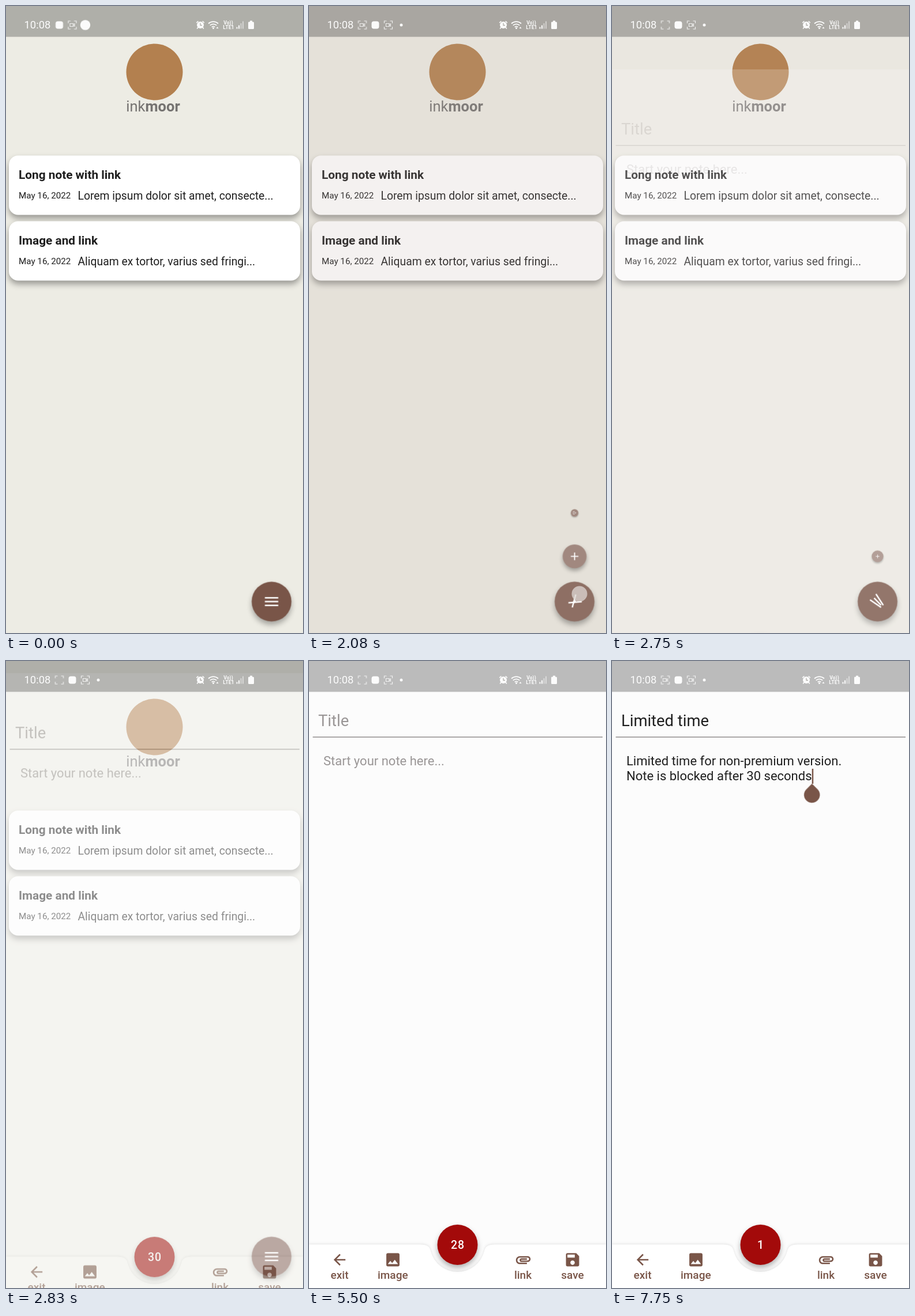
These frames come from a looping animation (515x1088 px, 8000 ms). An HTML page:

```html
<!DOCTYPE html>
<html lang="en">
<head>
<meta charset="utf-8">
<title>Notes app</title>
<style>
html, body { margin: 0; width: 100%; height: 100%; overflow: hidden; background: #edece4; }
svg { display: block; width: 100%; height: 100%; font-family: Roboto, sans-serif; }

/* Every animation is paused; the script moves --d along in 12 fps steps. */
.a { animation: 8s linear var(--d, 0s) infinite paused; }

.card { fill: #fff; filter: drop-shadow(0 6px 5.5px rgba(0,0,0,.36)); }
.head { font-size: 20.8px; font-weight: 700; }
.date { font-size: 15.2px; }
.text { font-size: 19.33px; }
.ink { fill: #1f1f1f; }
.hint { fill: #9a9696; }
.title { font-size: 27.4px; }
.body { font-size: 22px; }
.mid { text-anchor: middle; }
.lift { filter: drop-shadow(0 6px 5px rgba(0,0,0,.3)); }
.nav { fill: #795548; font-size: 19px; font-weight: 500; }
.white { fill: #fff; }
.line { fill: none; stroke: #fff; stroke-width: 2.5; }

.scrim { animation-name: scrim; }
.plus { animation-name: plus; }
.exit { animation-name: exit; }
.star { animation-name: star; }
.spin { animation-name: spin; }
.top { animation-name: top; }
.center { animation-name: center; }
.bottom { animation-name: bottom; }
.ripple { animation-name: ripple; }
.page { animation-name: rise, fade; }
.before { animation-name: before; }
.after { animation-name: after; }
.on-off { animation-name: onoff; animation-duration: 1s; }
.off-on { animation-name: offon; animation-duration: 1s; }
.tap1 { animation-name: tap1; }
.tap2 { animation-name: tap2; }
.shift { animation-name: shift; }
.appear { animation-name: appear; }
.shrink { animation-name: shrink; }

@keyframes scrim { 0%, 24.3% { opacity: 0 } 28.5%, 33.35% { opacity: .385 } 34.6%, 100% { opacity: 0 } }
@keyframes plus { 0%, 24.6% { transform: scale(0) } 26.6%, 34% { transform: scale(1) } 34.6%, 100% { transform: scale(0) } }
@keyframes exit { 0%, 25.6% { transform: scale(0) } 27.6%, 33.6% { transform: scale(1) } 34.1%, 100% { transform: scale(0) } }
@keyframes star { 0%, 26.6% { transform: scale(0) } 28.6%, 33.35% { transform: scale(1) } 33.8%, 100% { transform: scale(0) } }
@keyframes spin { 0%, 24.3% { transform: rotate(0deg) } 26.55%, 33.35% { transform: rotate(180deg) } 34.74%, 100% { transform: rotate(0deg) } }
@keyframes top { 0%, 24.3% { transform: translateY(-6.6px) rotate(0deg) } 26.55%, 33.35% { transform: translateY(0px) rotate(45deg) } 34.74%, 100% { transform: translateY(-6.6px) rotate(0deg) } }
@keyframes center { 0%, 24.3% { transform: scaleX(1) } 26.55%, 33.35% { transform: scaleX(0) } 34.74%, 100% { transform: scaleX(1) } }
@keyframes bottom { 0%, 24.3% { transform: translateY(6.6px) rotate(0deg) } 26.55%, 33.35% { transform: translateY(0px) rotate(-45deg) } 34.74%, 100% { transform: translateY(6.6px) rotate(0deg) } }
@keyframes ripple { 0%, 23.9% { opacity: 0 } 25%, 26.2% { opacity: .16 } 28.5%, 100% { opacity: 0 } }
@keyframes rise {
  0%, 32.92% { transform: translateY(272px); animation-timing-function: cubic-bezier(.4,0,.2,1) }
  36.67%, 100% { transform: translateY(0px) }
}
@keyframes fade {
  0%, 32.95% { opacity: 0; animation-timing-function: ease-in }
  36.7%, 100% { opacity: 1 }
}
@keyframes before { 0%, 70.82% { opacity: 1 } 70.83%, 100% { opacity: 0 } }
@keyframes after { 0%, 70.82% { opacity: 0 } 70.83%, 100% { opacity: 1 } }
@keyframes onoff { 0%, 49.9% { opacity: 1 } 50%, 100% { opacity: 0 } }
@keyframes offon { 0%, 49.9% { opacity: 0 } 50%, 100% { opacity: 1 } }
@keyframes tap1 { 0%, 23.9% { opacity: 0 } 24%, 26.5% { opacity: .75 } 27.5%, 100% { opacity: 0 } }
@keyframes tap2 { 0%, 32.1% { opacity: 0 } 32.2%, 33.9% { opacity: .5 } 34.3%, 100% { opacity: 0 } }
@keyframes shift {
  0%, .5% { transform: translateX(-22.5px); animation-timing-function: ease-in-out }
  5.5%, 100% { transform: translateX(0px) }
}
@keyframes appear { 0%, 2% { opacity: 0 } 5.5%, 100% { opacity: 1 } }
@keyframes shrink { 0%, .5% { transform: scale(3.5) } 5.5%, 100% { transform: scale(1) } }
</style>
</head>
<body>
<svg viewBox="0 0 515 1088" preserveAspectRatio="none">
  <defs>
    <path id="frame" class="line" style="stroke-width:1.2" opacity=".85" d="M-7-3v-4h4M3-7h4v4M7 3v4h-4M-3 7h-4v-4"/>
    <path id="cam" class="line" style="stroke-width:1.1" opacity=".85" d="M-4-2.500h5.500v5h-5.500zM1.500-.5L4-2v4L1.500 .5"/>
    <path id="bar" class="line" d="M-11.6 0H11.6"/>
  </defs>

  <g id="home">
    <rect width="515" height="1088" fill="#edece4"/>
    <circle cx="257.5" cy="114.5" r="49" fill="#b3804f"/>
    <text class="mid" x="255" y="183" font-size="25.5" fill="#757371">ink<tspan font-weight="600">moor</tspan></text>
    <g class="ink">
      <rect class="card" x="5" y="259.5" width="505" height="103" rx="16"/>
      <text class="head" x="22" y="300">Long note with link</text>
      <text class="date" x="22" y="334">May 16, 2022</text>
      <text class="text" x="124.5" y="335.5">Lorem ipsum dolor sit amet, consecte...</text>
      <rect class="card" x="5" y="373.5" width="505" height="103" rx="16"/>
      <text class="head" x="22" y="414">Image and link</text>
      <text class="date" x="22" y="448">May 16, 2022</text>
      <text class="text" x="124.5" y="449.5">Aliquam ex tortor, varius sed fringi...</text>
    </g>
    <rect class="a scrim" width="515" height="1088" fill="#b9a99f"/>

    <g transform="translate(460.5 804)"><g class="a star">
      <circle class="lift" r="28.5" fill="#a30a0a"/>
      <path class="white" transform="scale(1.27) translate(-12 -12)" d="M12 17.27L18.18 21l-1.64-7.03L22 9.24l-7.19-.61L12 2 9.19 8.63 2 9.24l5.46 4.73L5.82 21z"/>
    </g></g>
    <g transform="translate(460.5 879.5)"><g class="a exit">
      <circle class="lift" r="28.5" fill="#a1887f"/>
      <path class="line" d="M0-6v-4.5h-10.5v21H0V6M-4 0H10M6-4.5L10.5 0 6 4.5"/>
    </g></g>
    <g transform="translate(460.5 955)"><g class="a plus">
      <circle class="lift" r="28.5" fill="#a1887f"/>
      <path class="line" d="M-9 0H9M0-9V9"/>
    </g></g>
    <g transform="translate(460.5 1033.5)">
      <circle class="lift" r="34.5" fill="#795548"/>
      <circle class="a ripple white" r="34.5"/>
      <g class="a spin">
        <g class="a top"><use href="#bar"/></g>
        <g class="a center"><use href="#bar"/></g>
        <g class="a bottom"><use href="#bar"/></g>
      </g>
    </g>
  </g>

  <g class="a page">
    <rect width="515" height="1088" fill="#fcfcfc"/>
    <path d="M6.5 132H509" stroke="#8f8c8c" stroke-width="1.4"/>
    <g class="a before hint">
      <text class="title" x="16" y="113">Title</text>
      <text class="body" x="25" y="180.5">Start your note here...</text>
    </g>
    <g class="a after">
      <g class="ink">
        <text class="title" x="16" y="113">Limited time</text>
        <text class="body" x="25" y="180.5">Limited time for non-premium version.</text>
        <text class="body" x="25" y="206.5">Note is blocked after 30 seconds</text>
      </g>
      <rect class="a off-on" x="346.7" y="187" width="2.5" height="26" fill="#795548"/>
      <path transform="translate(346.7 232.3) rotate(45)" fill="#795548" d="M-13.7 0V-13.7H0A13.7 13.7 0 1 1-13.7 0z"/>
    </g>

    <path fill="#fff" style="filter:drop-shadow(0 -1px 2px rgba(0,0,0,.1))" d="M0 1012.5H192C205 1012.5 209 1016 211 1024A48 48 0 0 0 304 1024C306 1016 310 1012.5 323 1012.5H515V1088H0z"/>
    <circle cx="257.5" cy="1013" r="35" fill="#a30a0a" style="filter:drop-shadow(0 5px 5px rgba(0,0,0,.3))"/>
    <text id="secs" class="mid white" x="258" y="1019.5" font-size="19.5" font-weight="500" letter-spacing="1">30</text>
    <g class="nav">
      <path transform="translate(53 1039) scale(1.27) translate(-12 -12)" d="M20 11H7.83l5.59-5.59L12 4l-8 8 8 8 1.41-1.41L7.83 13H20z"/>
      <path transform="translate(145.5 1039) scale(1.27) translate(-12 -12)" d="M21 19V5c0-1.1-.9-2-2-2H5c-1.1 0-2 .9-2 2v14c0 1.1.9 2 2 2h14c1.1 0 2-.9 2-2zM8.5 13.5l2.5 3.01L14.5 12l4.5 6H5z"/>
      <path transform="translate(371.5 1039) scale(1.27) translate(-12 -12)" d="M2 12.5C2 9.46 4.46 7 7.5 7H18c2.21 0 4 1.79 4 4s-1.79 4-4 4H9.5C8.12 15 7 13.88 7 12.5S8.12 10 9.5 10H17v2H9.41c-.55 0-.55 1 0 1H18c1.1 0 2-.9 2-2s-.9-2-2-2H7.5C5.57 9 4 10.57 4 12.5S5.57 16 7.5 16H17v2H7.5C4.46 18 2 15.54 2 12.5z"/>
      <path transform="translate(457 1039) scale(1.27) translate(-12 -12)" d="M17 3H5c-1.11 0-2 .9-2 2v14c0 1.1.89 2 2 2h14c1.1 0 2-.9 2-2V7l-4-4zm-5 16c-1.66 0-3-1.34-3-3s1.34-3 3-3 3 1.34 3 3-1.34 3-3 3zm3-10H5V5h10v4z"/>
      <g class="mid">
        <text x="53" y="1072">exit</text>
        <text x="145.3" y="1072">image</text>
        <text x="371" y="1072">link</text>
        <text x="457" y="1072">save</text>
      </g>
    </g>
  </g>

  <g id="status">
    <rect width="515" height="53.5" fill="#000" opacity=".26"/>
    <g class="white" opacity=".95">
      <text x="31.5" y="39" font-size="18.4">10:08</text>
      <g class="a appear"><g transform="translate(92.5 33)">
        <use href="#frame"/>
        <g class="a before"><use class="a on-off" href="#cam"/></g>
        <g class="a after"><use class="a off-on" href="#cam"/></g>
      </g></g>
      <g class="a shift">
        <rect x="108.5" y="26.5" width="13" height="13" rx="4"/>
        <g transform="translate(137.5 33)"><use href="#frame"/><use href="#cam"/></g>
        <g transform="translate(160 33)"><circle class="a shrink" r="2.5"/></g>
      </g>

      <g transform="translate(337 33)">
        <circle r="6"/>
        <path class="line" style="stroke-width:1.6" d="M-6.8-3.8l3.2-2.800M6.800-3.800L3.600-6.600M-4 4l-1.800 2.500M4 4l1.800 2.500"/>
        <path fill="none" stroke="#b0aeaa" stroke-width="1.3" d="M0-3.500V.5H3"/>
      </g>
      <g transform="translate(359.5 39)">
        <path class="line" style="stroke-width:1.8" d="M-8.5-8.5A12.5 12.5 0 0 1 8.5-8.5M-5.7-5.4A8.3 8.3 0 0 1 5.7-5.4M-2.8-2.4A4.2 4.2 0 0 1 2.8-2.4"/>
        <circle r="1.5" cy="-.5"/>
        <path d="M5 0l2-3 2 3z"/>
      </g>
      <g class="mid" font-weight="700">
        <text x="385.5" y="32" font-size="8.6">Vo))</text>
        <text x="386" y="40" font-size="8.8">LTE1</text>
      </g>
      <path d="M399.5 39.5v-3h2v3zM403 39.5v-6h2v6z"/>
      <path opacity=".5" d="M406.5 39.5v-9.5h2v9.5zM410 39.5v-13h2v13z"/>
      <path d="M421 27.5h2v-2h4v2h1.5q1.5 0 1.5 1.5v9.5q0 1.5-1.5 1.5h-7q-1.5 0-1.5-1.5v-9.5q0-1.5 1-1.5z"/>
    </g>
  </g>

  <g fill="#ded8d4">
    <circle class="a tap1" cx="469" cy="1020" r="13.5"/>
    <circle class="a tap2" cx="461.5" cy="962" r="13.5"/>
  </g>
</svg>
<script>
const LOOP = 8000, FPS = 12, CUT = 5660;
const root = document.documentElement;
const secs = document.getElementById('secs');
const start = performance.now();

function secondsLeft(t) {
  const s = Math.floor(t / 1000);
  return t < CUT ? 30 - Math.max(0, s - 3) : 8 - s;
}

function draw() {
  const now = (performance.now() - start) % LOOP;
  const step = Math.floor((now + 5) * FPS / 1000) % (LOOP * FPS / 1000);
  const t = step * 1000 / FPS + 1;
  root.style.setProperty('--d', -t + 'ms');
  secs.textContent = secondsLeft(t);
  requestAnimationFrame(draw);
}
draw();
</script>
</body>
</html>
```
